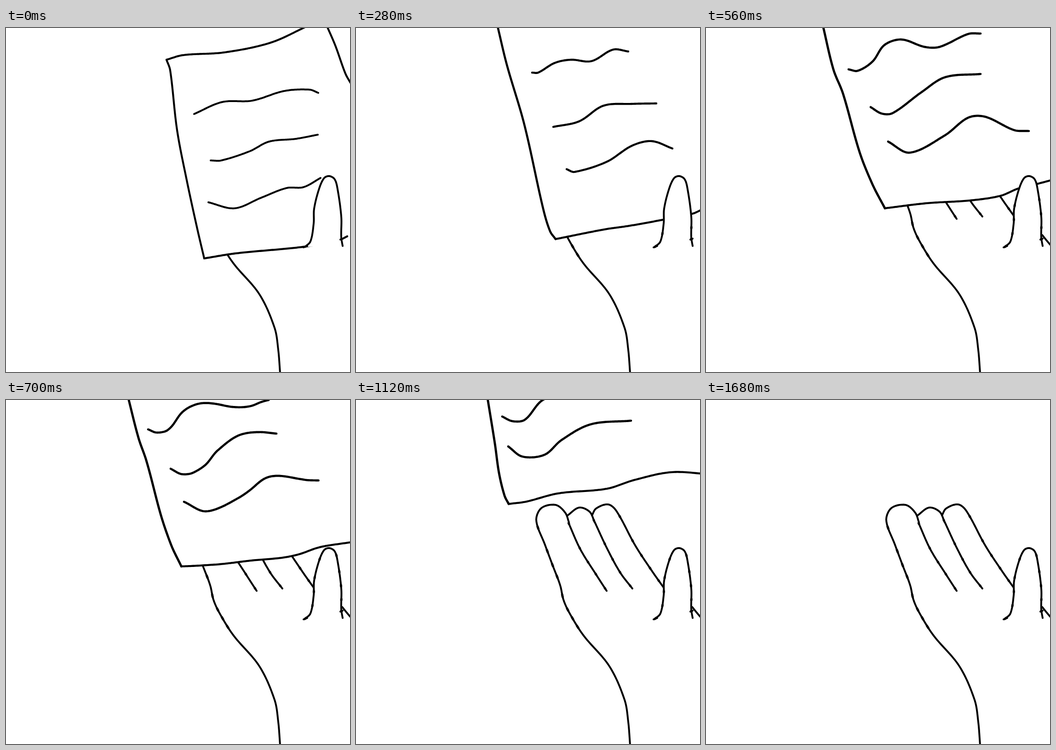
Write an HTML page with a canvas that moves like this. It is 748x748 px and loops after 1.82 s.

```html
<!DOCTYPE html>
<html lang="en">
<head>
<meta charset="utf-8">
<title>Hand and paper</title>
<style>
html, body { margin: 0; width: 100%; height: 100%; overflow: hidden; background: #fff; }
canvas { display: block; }
</style>
</head>
<body>
<canvas id="stage" width="748" height="748"></canvas>
<script>
const ctx = document.getElementById('stage').getContext('2d');
const STEP = 140, STEPS = 13, SAMPLES = 120;

// Key poses of the paper, two steps apart: side | base | written lines from the lowest up
const poses = [
  `349 69 357 92 372 222 393 331 416 437 431 501
   | 431 501 500 490 653 475 727 460 742 453
   | 440 379 497 392 555 369 610 348 647 346 684 326
   | 445 288 468 288 530 268 572 247 630 241 678 232
   | 409 187 470 161 535 158 605 137 660 134 679 141`,
  `308 -3 328 80 366 210 407 393 422 442 434 459
   | 434 459 540 438 595 430 667 417 731 404 765 388
   | 458 307 475 313 545 291 600 256 643 246 688 262
   | 429 215 485 203 538 169 600 165 653 164
   | 383 97 396 97 432 76 467 69 512 72 559 47 592 51`,
  `254 -6 277 90 298 143 334 270 362 340 389 392
   | 389 392 480 381 574 375 640 365 679 349 720 339 765 327
   | 396 247 443 271 520 233 570 195 607 193 670 222 702 224
   | 358 172 382 186 406 185 468 140 520 107 597 100
   | 310 90 330 93 362 73 388 37 425 25 475 41 508 41 570 13 597 12`,
  `280 -4 317 130 354 281 372 325
   | 372 325 415 327 465 326 535 313 602 307 690 285 765 283
   | 376 190 432 207 515 173 555 135 615 115 652 115
   | 358 122 385 131 433 111 452 72 495 38 543 31 577 40
   | 308 32 328 47 347 49 392 -2 440 -30 506 5 540 -15`,
  `286 -4 302 95 311 159 323 208 332 226
   | 332 226 370 221 440 203 545 193 605 174 685 157 765 161
   | 331 101 362 123 410 119 447 87 510 53 598 45
   | 318 36 340 46 367 43 410 -2 560 -40`,
  `260 -4 272 73 281 101 292 125
   | 292 125 425 127 475 124 560 103 685 66 735 66 770 75
   | 295 26 316 50 354 57 388 45 443 -2 520 -25 600 9`
].map(text => text.split('|').map(curve));

const farEdges = [
  '349 69 385 59 475 53 575 32 655 -4',
  '697 -6 716 38 738 99 750 121'
].map(curve);

const hand = [
  '463 266 455 245 434 228 403 235 392 262 411 315 427 358 444 403 451 434 463 461 494 511 551 579 584 652 592 700 596 750',
  '460 251 485 234 508 243 519 266',
  '462 267 488 325 523 381 545 415',
  '518 263 547 325 575 376 601 410',
  '513 251 522 236 548 227 566 241 607 316 643 371 669 408'
].map(curve);
const thumb = curve('650 476 662 464 669 425 670 393 681 349 692 326 703 322 714 328 720 345 729 410 729 455 732 474');
const thumbTicks = ['647 477 655 474', '727 460 732 458'].map(curve);
const palm = curve('731 450 739 460 750 473');

// Smooth curve through "x y x y ...", sampled evenly along its length
function curve(text) {
  const n = text.trim().split(/\s+/).map(Number);
  const p = [], t = [];
  for (let i = 0; i < n.length; i += 2) {
    const prev = p[p.length - 1];
    p.push([n[i], n[i + 1]]);
    t.push(prev ? t[t.length - 1] + Math.hypot(n[i] - prev[0], n[i + 1] - prev[1]) : 0);
  }
  const last = p.length - 1;
  const slope = (i, k) => {
    const lo = Math.max(0, i - 1), hi = Math.min(last, i + 1);
    return (p[hi][k] - p[lo][k]) / (t[hi] - t[lo]);
  };
  return Array.from({ length: SAMPLES + 1 }, (_, s) => {
    const u = s / SAMPLES * t[last];
    let i = 0;
    while (i < last - 1 && t[i + 1] < u) i++;
    const h = t[i + 1] - t[i], f = (u - t[i]) / h, g = 1 - f;
    return [0, 1].map(k =>
      g * g * ((1 + 2 * f) * p[i][k] + f * h * slope(i, k)) +
      f * f * ((1 + 2 * g) * p[i + 1][k] - g * h * slope(i + 1, k)));
  });
}

const shift = (pts, dx, dy) => pts.map(([x, y]) => [x + dx, y + dy]);

// Paper at a step; parts without a next pose slide off the top
function paperAt(step) {
  const k = step >> 1, m = step % 2 * 0.45;
  return poses[k].map((from, part) => {
    const to = poses[k + 1]?.[part] || shift(from, -16, -140);
    return from.map(([x, y], i) => [x + (to[i][0] - x) * m, y + (to[i][1] - y) * m]);
  });
}
const papers = Array.from({ length: STEPS - 1 }, (_, step) => paperAt(step));

// A nick stays on the hand wherever the base of the paper has crossed it
const nicks = papers.map(([, base]) => {
  const below = ([x, y]) => y > base.find(q => q[0] >= x)?.[1];
  return [...hand, thumb].flatMap(pts => pts
    .map((p, i) => [p, pts[i + 1] || p])
    .filter(([p, q]) => below(p) !== below(q)));
});

function trace(pts) {
  ctx.beginPath();
  pts.forEach(p => ctx.lineTo(...p));
}

function ink(pts, width) {
  trace(pts);
  ctx.lineWidth = width;
  ctx.stroke();
}

function mask(pts) {
  trace(pts);
  ctx.fill();
}

function drawPaper(step) {
  const [side, base, ...lines] = papers[step];
  const weight = Math.min(4.9, 4.2 + step * 0.2);
  mask([...side, ...base, [775, -10]]);
  ink(side, weight);
  ink(base, 4.3);
  lines.forEach(line => ink(line, weight - 0.2));
  if (step < 2) farEdges.forEach(edge => ink(shift(edge, -18 * step, -32 * step), weight));
}

function draw(step) {
  ctx.fillStyle = '#fff';
  ctx.fillRect(0, 0, 748, 748);
  ctx.strokeStyle = '#000';
  ctx.lineCap = ctx.lineJoin = 'round';
  hand.forEach(pts => ink(pts, 4));
  if (step < papers.length) drawPaper(step);
  mask(thumb);
  ink(thumb, 4);
  thumbTicks.forEach(pts => ink(pts, 4));
  if (step > 3) ink(palm, 4);
  nicks.slice(0, step).flat().forEach(pts => ink(pts, 5));
}

const start = performance.now();
function tick() {
  const t = Math.max(0, performance.now() - start);
  draw(Math.floor(t / STEP) % STEPS);
  requestAnimationFrame(tick);
}
tick();
</script>
</body>
</html>
```
